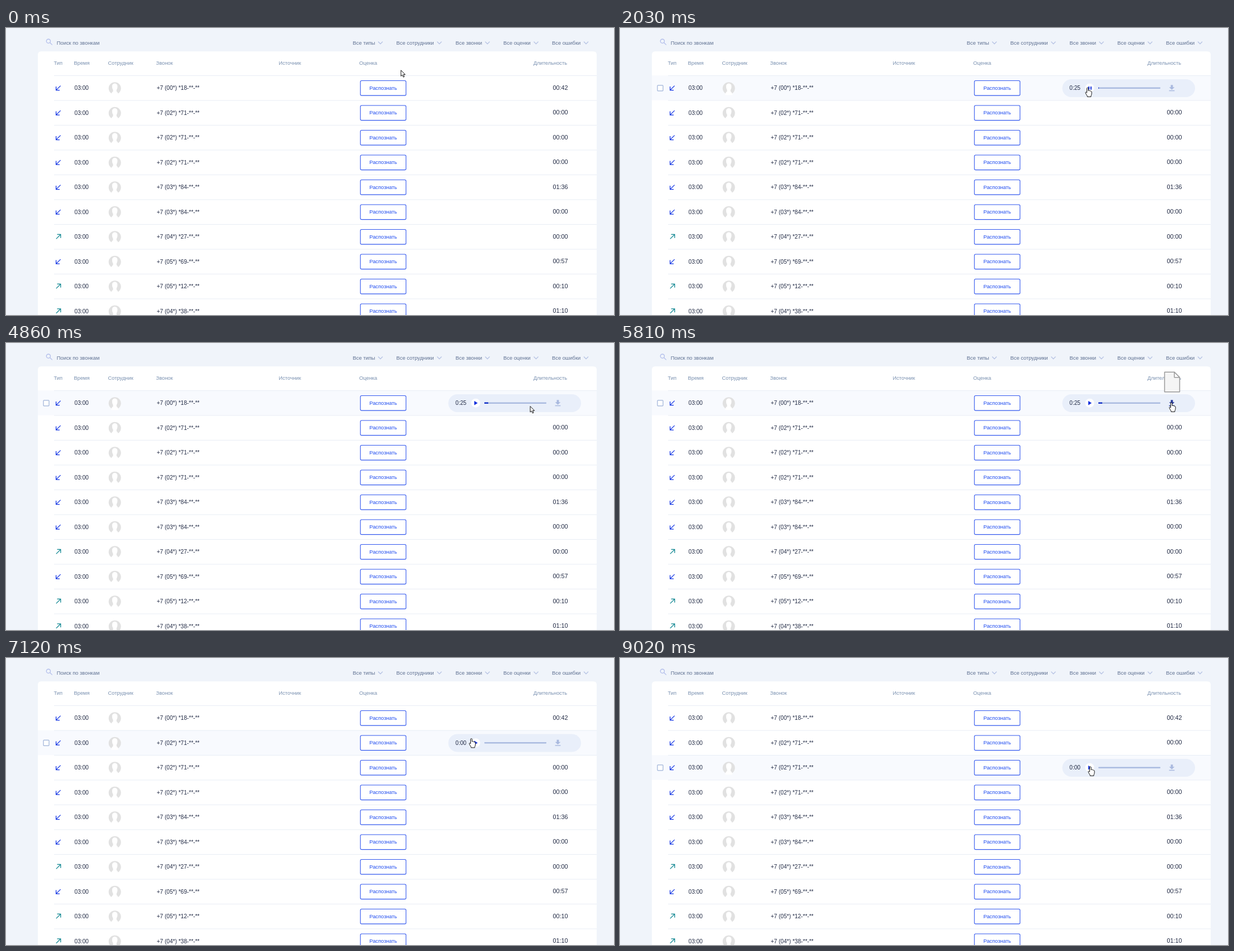
An HTML page for the animation above (9220 ms loop, 1088x515 px).

```html
<!DOCTYPE html>
<html lang="ru">
<head>
<meta charset="utf-8">
<title>Звонки</title>
<style>
  html, body { margin: 0; width: 100%; height: 100%; overflow: hidden; background: #f0f4fa; }
  svg { display: block; }
  text { font: 9.33px "Liberation Sans", Arial, sans-serif; fill: #7990b0; }
  .filter { fill: #5f7192; }
  .cell { font-size: 10.1px; fill: #222b45; }
  .length { font-size: 10.9px; fill: #222b45; }
  .button { fill: #1f4cf0; text-anchor: middle; }
  .icon { fill: none; stroke-width: 1.3; }
</style>
</head>
<body>
<svg id="stage" width="1088" height="515" viewBox="0 0 1088 515"></svg>
<script>
const LOOP = 9220, TOP = 85.2, PITCH = 44.5, MID = 22.5;

const filters = [
  [620.5, 'Все типы', 670], [698.5, 'Все сотрудники', 775.5], [804.5, 'Все звонки', 861.5],
  [890, 'Все оценки', 948.5], [977, 'Все ошибки', 1038]
];
const heads = [
  [85.5, 'Тип'], [121.5, 'Время'], [182.5, 'Сотрудник'], [268.5, 'Звонок'],
  [488, 'Источник'], [632, 'Оценка'], [943.7, 'Длительность']
];
// area code digits, number digits, duration, outgoing
const calls = [
  ['00', '18', '00:42'], ['02', '71', '00:00'], ['02', '71', '00:00'], ['02', '71', '00:00'],
  ['03', '84', '01:36'], ['03', '84', '00:00'], ['04', '27', '00:00', 1], ['05', '69', '00:57'],
  ['05', '12', '00:10', 1], ['04', '38', '01:10', 1]
];

// Moves: first step, last step, number of steps, end x, end y
const pointerMoves = [
  [70, 620, 9, 775, 112], [820, 1370, 8, 837, 107], [2820, 2890, 2, 841, 107],
  [3350, 3420, 2, 841, 111], [4300, 4640, 6, 900, 117], [4710, 5140, 7, 987, 107],
  [5880, 6430, 9, 868, 110], [6500, 6570, 2, 857, 110], [6640, 7120, 8, 833, 144.5],
  [7190, 7390, 4, 838, 149], [7520, 8160, 10, 840, 195], [8360, 8360, 1, 841, 195],
  [8890, 9020, 2, 842, 195]
];
const fileMoves = [[5540, 5810, 5, 988, 70], [5880, 6500, 10, 1104, -20]];
const playedAt = [2030, 2820, 3090, 3350, 3620, 3900, 4150];

const text = (x, y, s, cls = '') => `<text x="${x}" y="${y}" class="${cls}">${s}</text>`;
const icon = (d, color) => `<path class="icon" d="${d}" stroke="${color}"/>`;

function rowMarkup([code, part, length, outgoing], i) {
  const arrow = outgoing
    ? icon('M89.8 26.2L97.6 18.4M91.5 18.2H97.8V24.5', '#0c8590')
    : icon('M97.6 18.4L89.8 26.2M89.6 19.9V26.4H96', '#1436e4');
  return `<g transform="translate(0 ${TOP + i * PITCH})">
    <rect id="bg${i}" x="57" width="1000" height="${PITCH}" fill="#f8fafe"/>
    <path d="M86 .3H1057" stroke="#e8edf5"/>
    ${arrow}${text(122.6, 26, '03:00', 'cell')}
    <circle cx="194.7" cy="23" r="11" fill="#e1e1e1"/>
    <path fill="#fff" d="M194.7 14.2C198 14.2 199.7 16.7 199.5 20C199.4 23 198.6 24.6 197.8 25.8V28
      C198 29.5 201 30 201.2 35H188.2C188.4 30 191.4 29.5 191.6 28V25.8C190.8 24.6 190 23 189.9 20C189.7 16.7 191.4 14.2 194.7 14.2Z"/>
    ${text(269.7, 26, `+7 (${code}*) *${part}-**-**`, 'cell')}
    <rect x="634.2" y="9.3" width="81.6" height="26.6" rx="2.2" fill="#fff" stroke="#3157ee" stroke-width="1.1"/>
    ${text(675, 25.4, 'Распознать', 'button')}
    <g id="len${i}">${text(978.4, 25.4, length, 'length')}</g>
  </g>`;
}

const player = `<g id="player">
  <rect x="67" y="17.6" width="10" height="10" rx="1" fill="#fff" stroke="#9db2d8" stroke-width="1.2"/>
  <rect x="791.5" y="6.8" width="237.5" height="32" rx="16" fill="#e9effa"/>
  <text id="left" class="cell" x="804.3" y="26"></text>
  <circle cx="840.5" cy="${MID}" r="8" fill="#fff"/>
  <path id="play" d="M838 18.8L844 22.5L838 26.2Z" fill="#102fdd"/>
  <path id="pause" d="M838 19.7h2v5.8h-2zM841.8 19.7h2v5.8h-2z" fill="#102fdd"/>
  <rect x="856" y="21.3" width="111" height="2.4" rx=".8" fill="#aabbe0"/>
  <rect id="played" x="856" y="21.3" height="2.4" fill="#102fc8"/>
  <path id="save" d="M985.6 17h3.8v4h3L987.5 25.6L982.6 21h3zM982.6 26.6h9.8v1.4h-9.8z"/>
</g>`;

const stage = document.getElementById('stage');
stage.innerHTML = `
  <circle cx="75.9" cy="23.6" r="3.6" class="icon" stroke="#b3bfeb"/>
  ${icon('M78.6 26.3L82.8 30.4', '#b3bfeb')}
  ${text(90.8, 29.9, 'Поиск по звонкам', 'filter')}
  ${filters.map(([x, s, cx]) => text(x, 29.9, s, 'filter') +
    icon(`M${cx - 4} 24.5l4 4l4 -4`, '#b7c3e4')).join('')}
  <path d="M57 515V48Q57 42 63 42H1051Q1057 42 1057 48V515Z" fill="#fff"/>
  ${heads.map(([x, s]) => text(x, 66, s)).join('')}
  ${calls.map(rowMarkup).join('')}
  ${player}
  <g id="file" stroke="#999" stroke-width="1.5" stroke-linejoin="round">
    <path d="M-13.5 -17.8H4L13.5 -8.3V17.8H-13.5Z" fill="#f5f5f5"/>
    <path d="M4 -17.8V-8.3H13.5Z" fill="#fff"/>
  </g>
  <g id="pointer" fill="#fff" stroke="#111" stroke-width="1" stroke-linejoin="round">
    <path id="arrow" d="M.8 .8V11.4L3.2 9.2L5 13.2L6.8 12.4L5.1 8.6H8.4Z"/>
    <path id="hand" d="M-1.6 1.2C-1.6 -.3 1 -.3 1 1.2V5.6C1.2 4.6 3.2 4.8 3.3 6C3.6 5.2 5.3 5.5 5.4 6.7
      C6 6.2 7 6.6 7 7.8V11.5C7 13 5.8 14 5.8 15V16.4H-.8V15C-2 13.5 -3.4 11 -4 9.3C-4.4 8 -2.8 7.4 -1.6 9.2Z"/>
  </g>`;

const $ = id => document.getElementById(id);
const show = (id, on) => { $(id).style.display = on ? '' : 'none'; };
const place = (id, x, y) => $(id).setAttribute('transform', `translate(${x} ${y})`);

function position(moves, t, x, y) {
  for (const [from, to, steps, ex, ey] of moves) {
    if (t < from) break;
    const step = t >= to ? steps : Math.floor((t - from) / (to - from) * (steps - 1)) + 1;
    x += (ex - x) * step / steps;
    y += (ey - y) * step / steps;
  }
  return [x, y];
}

function overControl(x, dy) {
  const near = (cx, rx, ry) => Math.abs(x - cx) < rx && Math.abs(dy) < ry;
  return near(840.5, 10, 10) || near(911.5, 56, 5) || near(987.5, 9, 9);
}

function draw(t) {
  const [x, y] = position(pointerMoves, t, 706, 75);
  const row = Math.floor((y - TOP) / PITCH);
  const rowY = TOP + row * PITCH;
  const hovered = row >= 0;
  const first = row === 0;
  const playing = first && t >= 1700 && t < 4030;

  calls.forEach((_, i) => {
    show('bg' + i, i === row);
    show('len' + i, i !== row);
  });
  show('player', hovered);
  place('player', 0, rowY);
  $('left').textContent = first ? '0:25' : '0:00';
  show('play', !playing);
  show('pause', playing);
  $('played').setAttribute('width', first ? playedAt.filter(at => t >= at).length : 0);
  const onSave = Math.abs(x - 987.5) < 9 && t >= 5340;
  $('save').setAttribute('fill', onSave ? '#24379a' : '#a9b9df');

  show('file', t >= 5540 && t < 6500);
  place('file', ...position(fileMoves, t, 988, 92));

  const hand = hovered && overControl(x, y - rowY - MID);
  show('hand', hand);
  show('arrow', !hand);
  place('pointer', x, y);
}

function tick() {
  draw(performance.now() % LOOP);
  requestAnimationFrame(tick);
}
tick();
</script>
</body>
</html>
```
